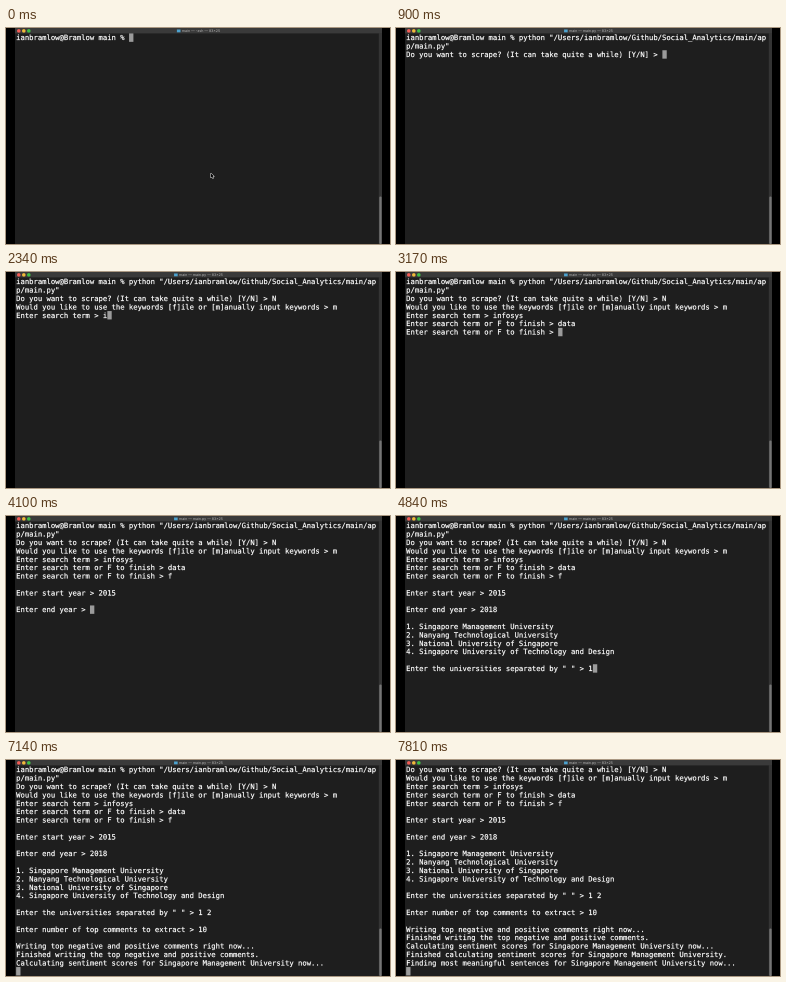
Animation, 384 px wide and 216 px high, one loop 8 s. Source, as an HTML page with a canvas:

```html
<!DOCTYPE html>
<html lang="en">
<head>
<meta charset="utf-8">
<title>Terminal session</title>
<style>
  html, body { margin: 0; width: 100%; height: 100%; overflow: hidden; background: #000; }
  canvas { display: block; width: 384px; height: 216px; }
</style>
</head>
<body>
<canvas id="stage" width="768" height="432"></canvas>
<script>
const LOOP = 8000;
const COLS = 83, ROWS = 25;
const FONT_SIZE = 7.214, CELL_W = 4.343, CELL_H = 8.4;
const LEFT = 10.15, TOP = 5.45, BASELINE = 6.7;

const ctx = document.getElementById('stage').getContext('2d');
ctx.scale(2, 2); // drawn at double size and shown small for soft, evenly spaced text
ctx.textRendering = 'geometricPrecision';
ctx.lineJoin = 'round';

// Each entry is [time, appended text]
const script = [];
const print = (time, text) => script.push([time, text]);
const type = (text, ...times) => times.forEach((time, i) => print(time, text[i]));

const school = 'Singapore Management University';

print(0, 'ianbramlow@Bramlow main % ');
print(130, 'python "/Users/ianbramlow/Github/Social_Analytics/main/app/main.py"');
print(180, '\n');
print(900, 'Do you want to scrape? (It can take quite a while) [Y/N] > ');
print(1230, 'N');
print(1370, '\nWould you like to use the keywords [f]ile or [m]anually input keywords > ');
print(2040, 'm');
print(2140, '\nEnter search term > ');
type('infosys', 2340, 2440, 2490, 2540, 2590, 2640, 2690);
print(2740, '\nEnter search term or F to finish > ');
type('data', 2940, 3000, 3060, 3110);
print(3170, '\nEnter search term or F to finish > ');
print(3370, 'f');
print(3400, '\n\nEnter start year > ');
type('2015', 3700, 3750, 3800, 4000);
print(4100, '\n\nEnter end year > ');
type('2018', 4300, 4370, 4430, 4500);
print(4570, `

1. ${school}
2. Nanyang Technological University
3. National University of Singapore
4. Singapore University of Technology and Design

Enter the universities separated by " " > `);
type('1 2 ', 4840, 4900, 4970, 5040);
print(5110, '\n\nEnter number of top comments to extract > ');
type('10', 5510, 5570);
print(5640, '\n\nWriting top negative and positive comments right now...\n');
print(6540, 'Finished writing the top negative and positive comments.\n' +
  `Calculating sentiment scores for ${school} now...\n`);
print(7570, `Finished calculating sentiment scores for ${school}.\n` +
  `Finding most meaningful sentences for ${school} now...\n`);

function visibleLines(time) {
  const text = script.filter(([at]) => at <= time).map(([, part]) => part).join('');
  const wrapped = text.split('\n').flatMap(line => {
    const rows = [];
    do {
      rows.push(line.slice(0, COLS));
      line = line.slice(COLS);
    } while (line);
    return rows;
  });
  return wrapped.slice(-ROWS);
}

function rect(color, x, y, w, h) {
  ctx.fillStyle = color;
  ctx.fillRect(x, y, w, h);
}

function drawWindow(title) {
  rect('#000', 0, 0, 384, 216);
  rect('#1e1e1e', 9, 0, 367, 216);
  rect('#3a3a3a', 9, 0, 367, 5.4);
  rect('#343434', 372.8, 5.4, 3.2, 210.6);
  ctx.fillStyle = '#757575';
  ctx.beginPath();
  ctx.roundRect(373.3, 168.5, 2.3, 47.5, 1.1);
  ctx.fill();

  ['#f25c55', '#f0b93a', '#3fc046'].forEach((color, i) => {
    ctx.fillStyle = color;
    ctx.beginPath();
    ctx.arc(12.8 + i * 5, 2.9, 1.75, 0, Math.PI * 2);
    ctx.fill();
  });

  ctx.font = '3.6px Inter, sans-serif';
  const width = ctx.measureText(title).width;
  const x = 192.5 - (width + 5) / 2;
  rect('#4da3cf', x, 1.5, 3.6, 2.8);
  ctx.fillStyle = '#b4b4b4';
  ctx.fillText(title, x + 5, 4.2);
}

function drawText(lines) {
  ctx.font = `${FONT_SIZE}px "DejaVu Sans Mono", monospace`;
  const row = lines.length - 1;
  rect('#9b9b9b', LEFT + lines[row].length * CELL_W, TOP + row * CELL_H, CELL_W, CELL_H);
  ctx.fillStyle = ctx.strokeStyle = '#fff';
  ctx.lineWidth = 0.2; // thickens the strokes a little
  lines.forEach((line, i) => {
    const y = TOP + i * CELL_H + BASELINE;
    ctx.fillText(line, LEFT, y);
    ctx.strokeText(line, LEFT, y);
  });
}

function drawPointer(x, y) {
  const arrow = new Path2D('M0 0V4.2L1 3.3L1.7 4.8L2.4 4.5L1.8 3H3Z');
  ctx.save();
  ctx.translate(x, y);
  ctx.strokeStyle = '#fff';
  ctx.lineWidth = 0.9;
  ctx.stroke(arrow);
  ctx.fillStyle = '#000';
  ctx.fill(arrow);
  ctx.restore();
}

function frame(now) {
  const time = now % LOOP;
  drawWindow(`main — ${time < 180 ? '-zsh' : 'main.py'} — 83×25`);
  drawText(visibleLines(time));
  if (time < 130) drawPointer(205, 145.4);
  requestAnimationFrame(frame);
}
requestAnimationFrame(frame);
</script>
</body>
</html>
```
